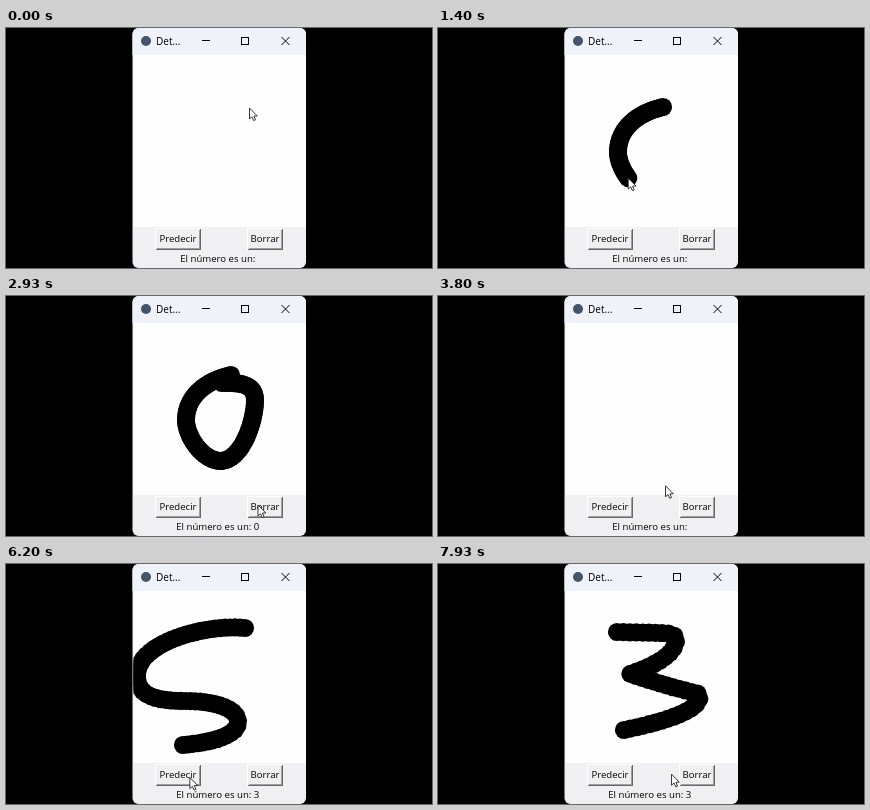
An HTML page with a canvas that plays this animation: 426 px wide and 240 px high, repeating every 8 s.

```html
<!DOCTYPE html>
<html lang="es">
<head>
<meta charset="utf-8">
<title>Detector</title>
<style>
html, body { margin: 0; width: 100%; height: 100%; overflow: hidden; background: #000; }
canvas { display: block; width: 100vw; height: 100vh; }
</style>
</head>
<body>
<canvas id="stage" width="426" height="240"></canvas>
<script>
const ctx = document.getElementById('stage').getContext('2d');
const LOOP = 8000, STEPS = 120, TICK = LOOP / STEPS;
const FONT = '"Open Sans", "Noto Sans", sans-serif';
const BRUSH = 9.1;
const HOME = { x: 243.5, y: 80 };
const PREDICT = { x: 176.5, y: 214 };
const ERASE = { x: 252, y: 209 };

// Pen path, dot spacing, and the times of drawing, pressing, answering and erasing
const digits = [
  { answer: 7, gap: 8, from: 130, to: 400, press: 530, show: 595, clear: 865,
    path: 'M170 67 Q177 72 194 73 L249 73.5 Q245 100 236 124 Q232 140 229 160' },
  { answer: 0, gap: 2.5, from: 1130, to: 1800, press: 2065, show: 2195, clear: 3000,
    path: 'M225 79 C195 86 180 104 180 124 C180 140 196 164 214 165 C236 165 249 125 249 104 C249 90 238 86 216 87' },
  { answer: 6, gap: 4, from: 4000, to: 4530, press: 4665, show: 4730, clear: 5050,
    path: 'M224 55 C208 74 179 110 179 134 C179 148 196 158 206 165 C222 164 239 148 239 137 C239 118 196 120 183 136' },
  { answer: 3, gap: 5, from: 5270, to: 5930, press: 6065, show: 6140, clear: 6530,
    path: 'M239 64 C200 60 131 78 131 112 C131 134 155 137 180 137 C205 137 232 143 232 158 C232 173 200 179 177 181' },
  { answer: 3, gap: 6.5, from: 6800, to: 7400, press: 7665, show: 7730, clear: 8110,
    path: 'M179 68 L225 69 Q240 70 238 77 Q236 95 192 110 Q225 121 261 130 Q268 149 186 166' }
];

// Evenly spaced brush dots along a path
function dotsAlong(d, gap) {
  const path = document.createElementNS('http://www.w3.org/2000/svg', 'path');
  path.setAttribute('d', d);
  const length = path.getTotalLength(), count = Math.round(length / gap);
  return Array.from({ length: count + 1 }, (_, i) => path.getPointAtLength(length * i / count));
}

for (const d of digits) d.dots = dotsAlong(d.path, d.gap);

const progress = (t, a, b) => Math.max(0, Math.min(1, (t - a) / (b - a)));
const smooth = u => u * u * (3 - 2 * u);
const easeOut = u => 1 - (1 - u) ** 3;
const easeIn = u => u ** 3;

function move(a, b, u, easeX = smooth, easeY = smooth) {
  return { x: a.x + (b.x - a.x) * easeX(u), y: a.y + (b.y - a.y) * easeY(u) };
}

function dotCount(d, t) {
  if (t < d.from || t >= d.clear) return 0;
  return 1 + Math.round(progress(t, d.from, d.to) * (d.dots.length - 1));
}

// Draw, go to the first button, go to the second one, then swing up to the next digit
function pointer(t) {
  const i = digits.findIndex(d => t < d.clear);
  const d = digits[i];
  if (t < d.from) {
    const leave = Math.max(i ? digits[i - 1].clear : 0, d.from - 400);
    return move(i ? ERASE : HOME, d.dots[0], progress(t, leave, d.from), easeOut, easeIn);
  }
  if (t < d.to) return d.dots[dotCount(d, t) - 1];
  if (t < d.show) return move(d.dots[d.dots.length - 1], PREDICT, progress(t, d.to, d.press));
  return move(PREDICT, ERASE, progress(t, d.show, d.clear - 80));
}

function rect(color, x, y, w, h) {
  ctx.fillStyle = color;
  ctx.fillRect(x, y, w, h);
}

function text(s, x, y, size, align) {
  ctx.font = size + 'px ' + FONT;
  ctx.textAlign = align;
  ctx.fillStyle = '#000';
  ctx.fillText(s, x, y);
}

function disc(x, y, r) {
  ctx.beginPath();
  ctx.arc(x, y, r, 0, Math.PI * 2);
  ctx.fill();
}

function button(label, x, w, down) {
  const y = 200, h = 22, n = down ? 1 : 0;
  rect(down ? '#686868' : '#fff', x, y, w, h);
  rect(down ? '#fff' : '#686868', x + 1, y + 1, w - 1, h - 1);
  rect(down ? '#a0a0a0' : '#f0f0f0', x + 1, y + 1, w - 2, h - 2);
  rect(down ? '#f0f0f0' : '#a0a0a0', x + 2, y + 2, w - 3, h - 3);
  rect('#f0f0f0', x + 2, y + 2, w - 4, h - 4);
  text(label, x + w / 2 + n, 214 + n, 9.6, 'center');
}

function titleBar() {
  rect('#eff3f9', 126, 0, 175, 27);
  ctx.fillStyle = '#44546a';
  disc(140, 13, 5);
  text('Det...', 150, 16.5, 10, 'left');
  ctx.strokeStyle = '#000';
  ctx.lineWidth = 1;
  ctx.strokeRect(235.5, 9.5, 7, 7);
  ctx.stroke(new Path2D('M196 12.5 h8 M275.5 9 l8 8 m0 -8 l-8 8'));
}

const arrowShape = new Path2D('M0 0 V11 L2.5 8.8 L4.2 12.6 L6 11.8 L4.4 8.1 L7.8 8 Z');

function arrow({ x, y }) {
  ctx.save();
  ctx.translate(x, y);
  ctx.fillStyle = '#fff';
  ctx.fill(arrowShape);
  ctx.strokeStyle = '#222';
  ctx.lineWidth = 0.9;
  ctx.stroke(arrowShape);
  ctx.restore();
}

function drawing(t) {
  ctx.save();
  ctx.beginPath();
  ctx.rect(127.5, 27, 172.5, 172);
  ctx.clip();
  rect('#fefefe', 126, 27, 175, 172);
  ctx.fillStyle = '#000';
  for (const d of digits) {
    for (const p of d.dots.slice(0, dotCount(d, t))) disc(p.x, p.y, BRUSH);
  }
  ctx.restore();
}

function render(t) {
  rect('#000', 0, 0, 426, 240);
  ctx.save();
  ctx.beginPath();
  ctx.roundRect(126.5, 0, 173.5, 240, 6);
  ctx.clip();
  rect('#f0f0f2', 126, 0, 175, 240);
  titleBar();
  drawing(t);

  const pressed = digits.some(d => t >= d.press && t < d.show);
  const shown = digits.find(d => t >= d.show && t < d.clear);
  button('Predecir', 149, 46, pressed);
  button('Borrar', 241, 36, false);
  text('El número es un:' + (shown ? ' ' + shown.answer : ''), 211.8, 234, 9.6, 'center');
  arrow(pointer(t));
  ctx.restore();
}

const start = performance.now();
function frame() {
  const t = (performance.now() - start) % LOOP;
  render(Math.min(STEPS - 1, Math.floor((t + 5) / TICK)) * TICK);
  requestAnimationFrame(frame);
}
frame();
</script>
</body>
</html>
```
